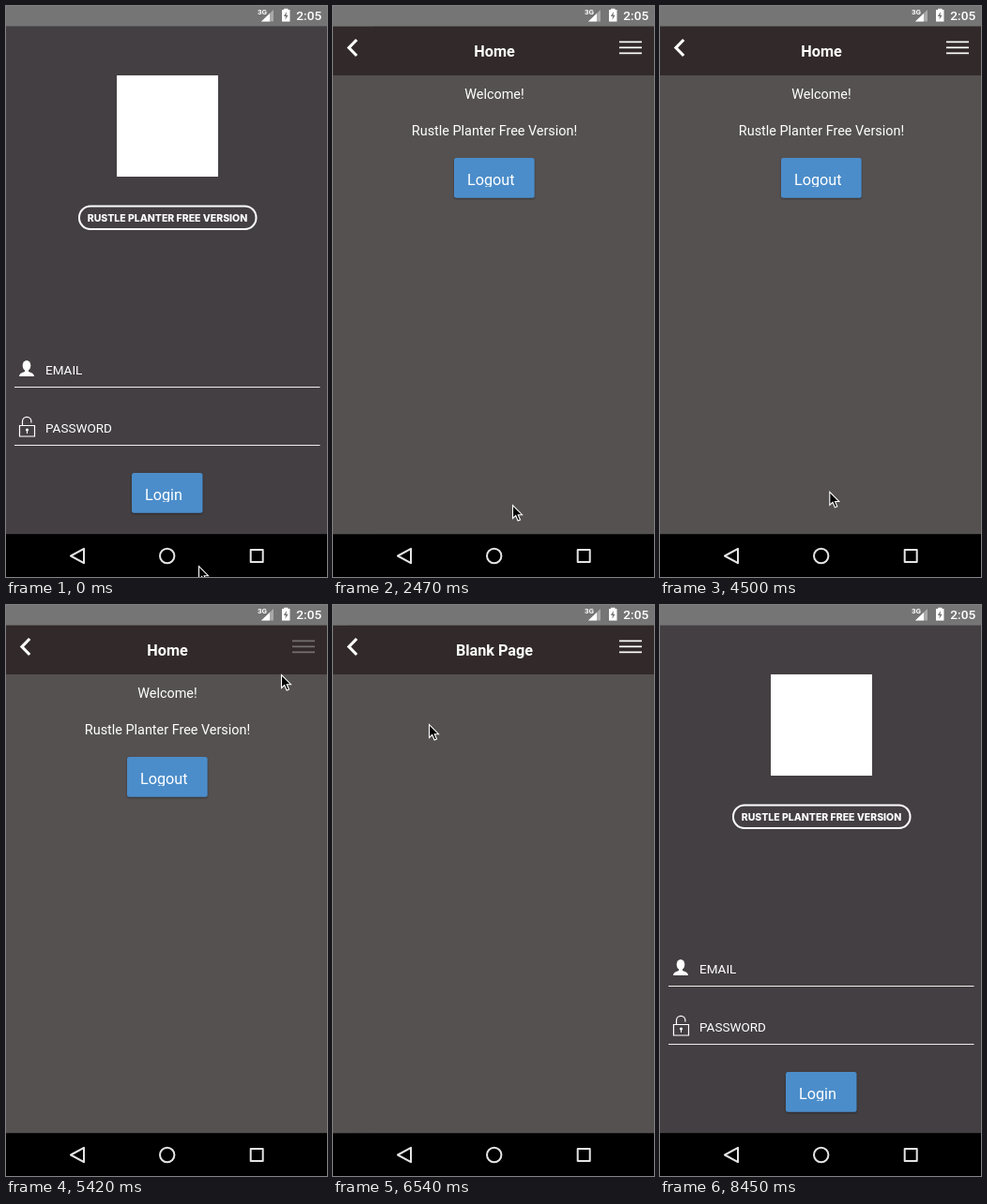
Recreate the animation shown at these times as an HTML page with a canvas. Size 342 by 609 pixels, loop 8.89 s.

```html
<!DOCTYPE html>
<html lang="en">
<head>
<meta charset="utf-8">
<title>Starter app</title>
<style>
  html, body { margin: 0; width: 100%; height: 100%; overflow: hidden; background: #000; }
  canvas { display: block; width: 342px; height: 609px; }
</style>
</head>
<body>
<canvas id="stage"></canvas>
<script>
const W = 342, H = 609, TOP = 21.5, BOTTOM = 563.4, PAGE_H = BOTTOM - TOP;
const LOOP = 8890, DRAWER_W = 274;
const FONT = 'Roboto, sans-serif';
const canvas = document.getElementById('stage');
const ctx = canvas.getContext('2d');
const dpr = window.devicePixelRatio || 1;
canvas.width = W * dpr;
canvas.height = H * dpr;

// Each tap: the pointer travels to a spot, then the page may turn.
const LOGIN = 0, HOME = 1, BLANK = 2;
const taps = [
  { spot: [191, 532], move: [1150, 1880], page: HOME, turn: [2380, 2470] },
  { spot: [177, 184], move: [2790, 3270], page: LOGIN, turn: [3290, 3510] },
  { spot: [180, 519], move: [3800, 4070], page: HOME, turn: [4300, 4470] },
  { spot: [293, 74], move: [4480, 5160] },
  { spot: [102, 127], move: [5520, 5920], page: BLANK, turn: [6360, 6540] },
  { spot: [24, 46], move: [6680, 6960], page: HOME, turn: [7293, 7495] },
  { spot: [176, 186], move: [7450, 7730], page: LOGIN, turn: [8000, 8190] },
  { spot: [204, 611], move: [8130, 8440] }
];

function ease(t, from, to) {
  const u = Math.min(1, Math.max(0, (t - from) / (to - from)));
  return u * u * (3 - 2 * u);
}

const mix = (a, b, u) => a + (b - a) * u;

// Opacity of a control pressed from one time to another.
const pressed = (t, down, up) =>
  1 - .8 * (ease(t, down, down + 30) - ease(t, up, up + 120));

function pointerAt(t) {
  return taps.reduce(([x, y], { spot, move }) => {
    const u = ease(t, ...move);
    return [mix(x, spot[0], u), mix(y, spot[1], u)];
  }, [205, 597]);
}

function pageAt(t) {
  return taps.filter(tap => tap.turn).reduce(
    (pos, { page, turn }) => mix(pos, page, ease(t, ...turn)), LOGIN);
}

const drawerAt = t => ease(t, 5440, 5650) - ease(t, 6190, 6280);

function rect(x, y, w, h, color) {
  ctx.fillStyle = color;
  ctx.fillRect(x, y, w, h);
}

function text(str, x, y, size, align = 'left', weight = 400, family = FONT) {
  ctx.font = `${weight} ${size}px ${family}`;
  ctx.textAlign = align;
  ctx.fillStyle = '#fff';
  ctx.fillText(str, x, y);
}

function stroke(color, width) {
  ctx.strokeStyle = color;
  ctx.lineWidth = width;
  ctx.stroke();
}

function fill(color) {
  ctx.fillStyle = color;
  ctx.fill();
}

function poly(...points) {
  ctx.beginPath();
  points.forEach(([x, y]) => ctx.lineTo(x, y));
  ctx.closePath();
}

function circle(x, y, r) {
  ctx.beginPath();
  ctx.arc(x, y, r, 0, 2 * Math.PI);
}

function button(label, x, y, w) {
  ctx.save();
  ctx.shadowColor = 'rgba(0,0,0,.4)';
  ctx.shadowBlur = 2 * dpr;
  ctx.shadowOffsetY = dpr;
  ctx.beginPath();
  ctx.roundRect(x, y, w, 42.7, 2.5);
  fill('#4b8dca');
  ctx.restore();
  // The label's line box cuts its descenders.
  ctx.save();
  ctx.beginPath();
  ctx.rect(x, y, w, 31);
  ctx.clip();
  text(label, x + 14, y + 29, 16.2);
  ctx.restore();
}

function personIcon() {
  ctx.beginPath();
  ctx.ellipse(22, 383.5, 4.3, 5.5, 0, 0, 2 * Math.PI);
  fill('#fff');
  rect(20, 387, 4, 4, '#fff');
  ctx.beginPath();
  ctx.moveTo(14, 395);
  ctx.quadraticCurveTo(14, 391.5, 20, 390);
  ctx.lineTo(24, 390);
  ctx.quadraticCurveTo(30, 391.5, 30, 395);
  fill('#fff');
}

function lockIcon() {
  ctx.beginPath();
  ctx.rect(14.5, 447.5, 16, 11.5);
  ctx.moveTo(17.5, 447);
  ctx.arc(22.2, 443, 4.7, Math.PI, 0);
  ctx.lineTo(26.9, 444.5);
  stroke('#fff', 1.2);
  circle(22.5, 452, 1.6);
  fill('#fff');
  rect(22, 452, 1, 4, '#fff');
}

function field(label, y, icon) {
  icon();
  text(label, 42, y, 13.5);
  rect(9, y + 13.2, 325.5, 1, '#eee');
}

function header(title, backAlpha, menuAlpha) {
  rect(0, TOP, W, 74 - TOP, '#322a2a');
  text(title, 172, 54, 16.2, 'center', 700);
  ctx.globalAlpha = backAlpha;
  ctx.beginPath();
  ctx.moveTo(25.2, 36);
  ctx.lineTo(17, 44.5);
  ctx.lineTo(25.2, 53);
  stroke('#fff', 3.2);
  ctx.globalAlpha = menuAlpha;
  for (let i = 0; i < 3; i++) rect(305, 37.5 + 6 * i, 24, 1.7, '#fff');
  ctx.globalAlpha = 1;
}

function login() {
  rect(0, TOP, W, PAGE_H, '#443f42');
  rect(118, 74, 108, 108, '#fff');
  ctx.beginPath();
  ctx.roundRect(78, 213.5, 188.5, 24.5, 12);
  stroke('#fff', 2);
  text('RUSTLE PLANTER FREE VERSION', 172, 229.8, 10.5, 'center', 800, 'Inter, sans-serif');
  field('EMAIL', 392.8, personIcon);
  field('PASSWORD', 454.8, lockIcon);
  button('Login', 134, 498, 75.5);
}

function home(t) {
  rect(0, TOP, W, PAGE_H, '#555151');
  header('Home', 1, pressed(t, 5300, 5390));
  text('Welcome!', 172, 98.8, 14.4, 'center');
  text('Rustle Planter Free Version!', 172, 138, 14.4, 'center');
  button('Logout', 129, 162, 85.7);
}

function blank(t) {
  rect(0, TOP, W, PAGE_H, '#555151');
  header('Blank Page', pressed(t, 7190, 7390), 1);
}

const pages = [login, home, blank];

function drawPages(t) {
  const pos = pageAt(t), i = Math.floor(pos), p = pos - i;
  if (p === 0) return pages[i](t);
  const midY = (TOP + BOTTOM) / 2, scale = 1 - .05 * p;
  rect(0, TOP, W, PAGE_H, '#eee');
  ctx.save();
  ctx.translate(W / 2 - .3 * W * p, midY);
  ctx.scale(scale, scale);
  ctx.translate(-W / 2, -midY);
  pages[i](t);
  ctx.restore();
  // Veil in the backdrop colour fades the page underneath.
  rect(0, TOP, W, PAGE_H, `rgba(238,238,238,${.7 * p})`);
  ctx.save();
  ctx.translate(W * (1 - p), 0);
  pages[i + 1](t);
  ctx.restore();
}

function drawDrawer(t) {
  ctx.save();
  ctx.translate(DRAWER_W * (drawerAt(t) - 1), 0);
  rect(0, TOP, DRAWER_W, PAGE_H, '#000');
  ['Home', 'Blank Page'].forEach((label, i) => {
    text(label, 20, 80.5 + 50 * i, 16);
    rect(0, 98.6 + 50 * i, DRAWER_W, 1.2, '#c8c8c8');
  });
  ctx.restore();
}

function statusBar() {
  rect(0, 0, W, TOP, '#757575');
  text('3G', 268, 8.8, 8, 'left', 700);
  poly([285, 4], [285, 16.5], [272, 16.5]);
  fill('#a9a9a9');
  poly([281, 8], [281, 16.5], [272, 16.5]);
  fill('#fff');
  rect(296, 2.8, 4.5, 2, '#fff');
  rect(294, 4, 8.5, 12.6, '#fff');
  poly([299, 6], [295.8, 11], [298, 11], [297.4, 14.8], [300.7, 9.8], [298.5, 9.8]);
  fill('#757575');
  text('2:05', 336.3, 15, 13.7, 'right', 500);
}

function navBar() {
  const color = '#e4e4e4';
  rect(0, BOTTOM, W, H - BOTTOM, '#000');
  ctx.lineJoin = 'round';
  poly([83, 578.8], [83, 594.2], [69, 586.5]);
  stroke(color, 2);
  circle(171.7, 586.5, 7.7);
  stroke(color, 2);
  ctx.beginPath();
  ctx.rect(260.7, 580, 13, 13);
  stroke(color, 2);
  ctx.lineJoin = 'miter';
}

function drawPointer(t) {
  const [x, y] = pointerAt(t);
  if (y > H) return;
  ctx.save();
  ctx.translate(x + .5, y + .5);
  poly([0, 0], [0, 14], [3.2, 11], [5.6, 16.5], [8, 15.5], [5.7, 10.2], [10, 10.2]);
  fill('#000');
  stroke('#fff', 1.1);
  ctx.restore();
}

function frame(t) {
  ctx.setTransform(dpr, 0, 0, dpr, 0, 0);
  drawPages(t);
  drawDrawer(t);
  statusBar();
  navBar();
  drawPointer(t);
}

const start = performance.now();
function tick() {
  frame((performance.now() - start) % LOOP);
  requestAnimationFrame(tick);
}
tick();
</script>
</body>
</html>
```
